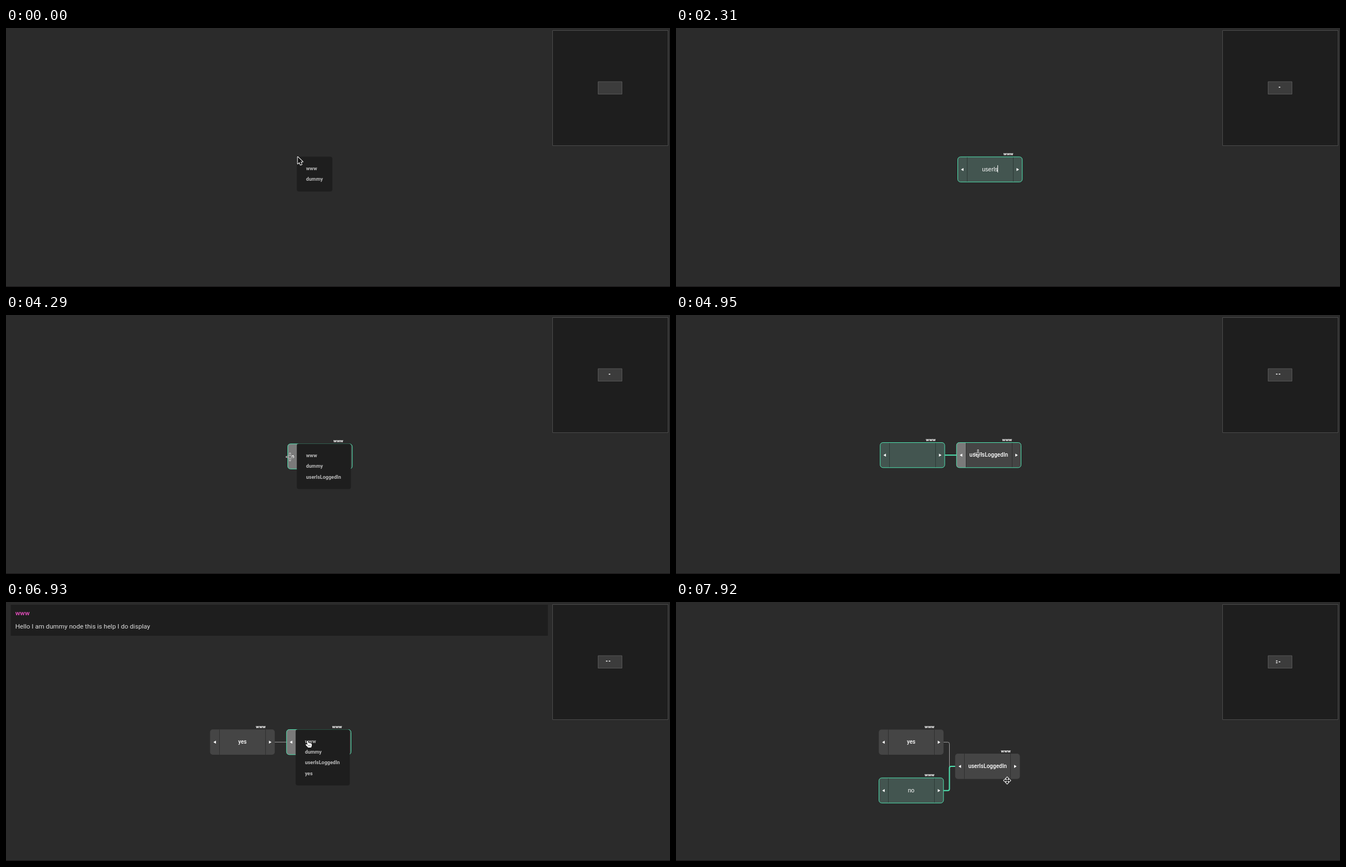
Animation, 1196 px wide and 468 px high, one loop 8000 ms. Source, as an HTML page with a canvas:

```html
<!DOCTYPE html>
<html lang="en">
<head>
<meta charset="utf-8">
<title>Node editor</title>
<style>
  html, body { margin: 0; width: 100%; height: 100%; overflow: hidden; background: #2b2b2b; }
  canvas { display: block; }
</style>
</head>
<body>
<canvas id="stage" width="1196" height="468"></canvas>
<script>
const ctx = document.getElementById('stage').getContext('2d');
const LOOP = 8000, STEP = 330;
const GREEN = '#50e3b0', DARK = '#1e1e1e';
const NODE_W = 116.6, NODE_H = 45.6, PORT = 17;
const ROBOTO = 'Roboto, sans-serif', INPUT = '"Liberation Sans", sans-serif';
const NAME = 'userIsLoggedIn';
const TYPED = { 5: 2, 6: 4, 7: 6, 8: 9, 9: 11, 10: 12, 11: 14 };

// Pointer kind and position, from the given step on
const POINTER = {
  0: ['arrow', 525.5, 233], 1: ['finger', 550, 247.5], 2: ['finger', 564, 268.5],
  3: ['beam', 551, 255.5], 5: null, 11: ['palm', 491, 286], 12: ['palm', 478, 285.5],
  13: ['plus', 511.5, 256.5], 14: ['finger', 558, 263.5], 15: ['plus', 544, 250.5],
  16: null, 17: ['plus', 518.5, 256], 19: ['finger', 538, 250], 21: ['finger', 538.6, 250],
  22: ['plus', 541, 251], 23: null, 24: ['move', 596.5, 322.5]
};

const SHAPES = {
  arrow: new Path2D('M0 0V12.3L2.9 9.6L5 14.3L7.2 13.3L5.1 8.8H9Z'),
  finger: new Path2D('M3.2 1.5Q4.6 0 5.4 1.8L6.6 5Q8 4 8.8 5.2Q10 4.6 10.8 5.8Q12 5.6 12.2 7V10L11 13H5.6L2 9.2Q.4 7.2 2 6.8L4.4 8Z'),
  palm: new Path2D('M2.6 12.6L.5 8.5Q0 6.6 2.4 7.8L1.6 3.5Q2 1.6 3.5 3L4.5 5.5L4.4 1.6Q5.4 -.2 6.5 1.6L7 5L8 1.8Q9.4 .8 9.8 2.5L9.5 5.7L11 4Q12.4 3.8 12 5.8L10.2 12.6Z'),
  plus: new Path2D('M-6 0H6M0 -6V6'),
  beam: new Path2D('M-2.5 -6Q0 -6 0 -4V4Q0 6 -2.5 6M2.5 -6Q0 -6 0 -4M0 4Q0 6 2.5 6M-1.5 2H1.5'),
  move: new Path2D('M0 -6L2.6 -3H.8V-.8H3V-2.6L6 0L3 2.6V.8H.8V3H2.6L0 6L-2.6 3H-.8V.8H-3V2.6L-6 0L-3 -2.6V-.8H-.8V-3H-2.6Z')
};

function box(x, y, w, h, r, fill, stroke) {
  ctx.beginPath();
  ctx.roundRect(x, y, w, h, r);
  if (fill) { ctx.fillStyle = fill; ctx.fill(); }
  if (stroke) { ctx.strokeStyle = stroke; ctx.lineWidth = 1; ctx.stroke(); }
}

function text(str, x, y, size, color, { weight = 400, family = ROBOTO, align = 'left' } = {}) {
  ctx.font = `${weight} ${size}px ${family}`;
  ctx.textAlign = align;
  ctx.fillStyle = color;
  ctx.fillText(str, x, y);
  return ctx.measureText(str).width;
}

function triangle(x, y, dir) {
  ctx.fillStyle = '#fff';
  ctx.beginPath();
  ctx.moveTo(x + 2.3 * dir, y);
  ctx.lineTo(x - 2.2 * dir, y - 2.8);
  ctx.lineTo(x - 2.2 * dir, y + 2.8);
  ctx.fill();
}

function node(x, y, str, { selected, hover, caret } = {}) {
  box(x, y, NODE_W, NODE_H, 5, selected ? '#435550' : '#454545');
  if (hover) box(x, y, PORT, NODE_H, [5, 0, 0, 5], '#7a7a7a');
  ctx.fillStyle = selected ? '#2d3a36' : '#2f2f2f';
  for (const edge of [PORT, NODE_W - PORT + .5]) ctx.fillRect(Math.floor(x + edge), y, 1, NODE_H);
  if (selected || hover) box(x + .3, y + .2, NODE_W - .4, NODE_H - .3, 5, null, GREEN);
  triangle(x + 8.4, y + 23, -1);
  triangle(x + 108.4, y + 23, 1);
  text('www', x + 100.2, y - 2.3, 8, '#fff', { weight: 700, align: 'right' });
  const mid = x + 58.3;
  const width = selected
    ? text(str, mid, y + 25.8, 10.5, '#fff', { family: INPUT, align: 'center' })
    : text(str, mid, y + 26, 10, '#fff', { weight: 500, align: 'center' });
  if (caret) {
    ctx.fillStyle = '#fff';
    ctx.fillRect(Math.floor(mid + width / 2), Math.round(y + 15.4), 1, 13);
  }
}

function menu(x, y, items) {
  const width = items.length > 2 ? 97.5 : 64;
  box(x, y, width, 24.5 + 19.2 * items.length, 4, DARK);
  items.forEach((item, i) => text(item, x + 16.7, y + 24.6 + 19.2 * i, 9, '#b9b9b9', { weight: 700 }));
}

function help() {
  box(8.5, 5, 967.5, 56, 0, DARK);
  text('www', 16.7, 24, 11.65, '#e84fc0', { weight: 500 });
  text('Hello I am dummy node this is help I do display', 16.7, 47.5, 11.65, '#dedede');
}

function minimap(marks) {
  box(984.5, 4.5, 208, 208, 0, DARK, '#4b4b4b');
  box(1066.5, 97, 43, 22.5, 0, '#3c3c3c', '#565656');
  ctx.fillStyle = '#fff';
  for (const [x, y] of marks) ctx.fillRect(x, y, 2.7, 1.5);
}

function link(path, color, width) {
  ctx.strokeStyle = color;
  ctx.lineWidth = width;
  ctx.stroke(new Path2D(path));
}

function pointer(step) {
  while (!(step in POINTER)) step--;
  if (!POINTER[step]) return;
  const [kind, x, y] = POINTER[step], shape = SHAPES[kind];
  const pen = (color, width) => { ctx.strokeStyle = color; ctx.lineWidth = width; ctx.stroke(shape); };
  ctx.save();
  ctx.translate(x, y);
  ctx.lineJoin = 'round';
  if (kind === 'plus') {
    ctx.lineCap = 'square';
    pen('#fff', 2.6);
    pen('#222', 1);
  } else if (kind === 'beam') {
    pen('rgba(255,255,255,.25)', 2.4);
    pen('#111', 1.1);
  } else if (kind === 'finger' || kind === 'palm') {
    pen('#111', 1.6);
    ctx.fillStyle = '#fff';
    ctx.fill(shape);
    ctx.strokeStyle = '#555';
    ctx.lineWidth = .7;
    ctx.stroke(new Path2D('M5.6 8V11M7.4 8V11M9.2 8V11'));
  } else {
    pen('#fff', 2);
    ctx.fillStyle = '#111';
    ctx.fill(shape);
  }
  ctx.restore();
}

function draw(step) {
  ctx.fillStyle = '#2b2b2b';
  ctx.fillRect(0, 0, 1196, 468);
  ctx.fillStyle = '#171214';
  ctx.fillRect(0, 467, 1196, 1);

  if (step < 3) {
    minimap([]);
    menu(523.8, 232.5, ['www', 'dummy']);
  } else if (step < 15) {
    minimap([[1085.7, 106.2]]);
    const str = step < 12 ? NAME.slice(0, TYPED[step] || 0) : NAME;
    node(507.2, 232.7, str, { selected: step < 12, hover: step > 12, caret: step > 3 && step < 12 });
    if (step > 12) menu(523.8, 232.5, ['www', 'dummy', NAME]);
  } else if (step < 22) {
    minimap([[1080.7, 106], [1085.7, 106]]);
    const editing = step < 18;
    link('M484 253.2H505', editing ? GREEN : '#a0a0a0', editing ? 2 : 1);
    node(367.5, 230.3, step > 15 ? 'yes' : '', { selected: editing });
    node(505, 230.3, NAME, { hover: true });
    if (!editing) menu(521.7, 230.3, ['www', 'dummy', NAME, 'yes']);
  } else {
    minimap([[1080.7, 105.8], [1080.7, 109], [1085.7, 107.4]]);
    link('M482 253.3H489.5Q492.5 253.3 492.5 256.3V297', '#a0a0a0', 1);
    link('M482 340.7H489.5Q492.5 340.7 492.5 337.7V300Q492.5 297 495.5 297H503', GREEN, 2);
    node(365.3, 230.4, 'yes');
    node(365.3, 317.7, step > 22 ? 'no' : '', { selected: true, caret: step === 23 });
    node(502.8, 274.1, NAME, { hover: step < 24 });
  }
  if (step === 2 || step === 14 || (step > 18 && step < 22)) help();
  pointer(step);
}

function tick() {
  draw(Math.floor(performance.now() % LOOP / STEP));
  requestAnimationFrame(tick);
}
tick();
</script>
</body>
</html>
```
